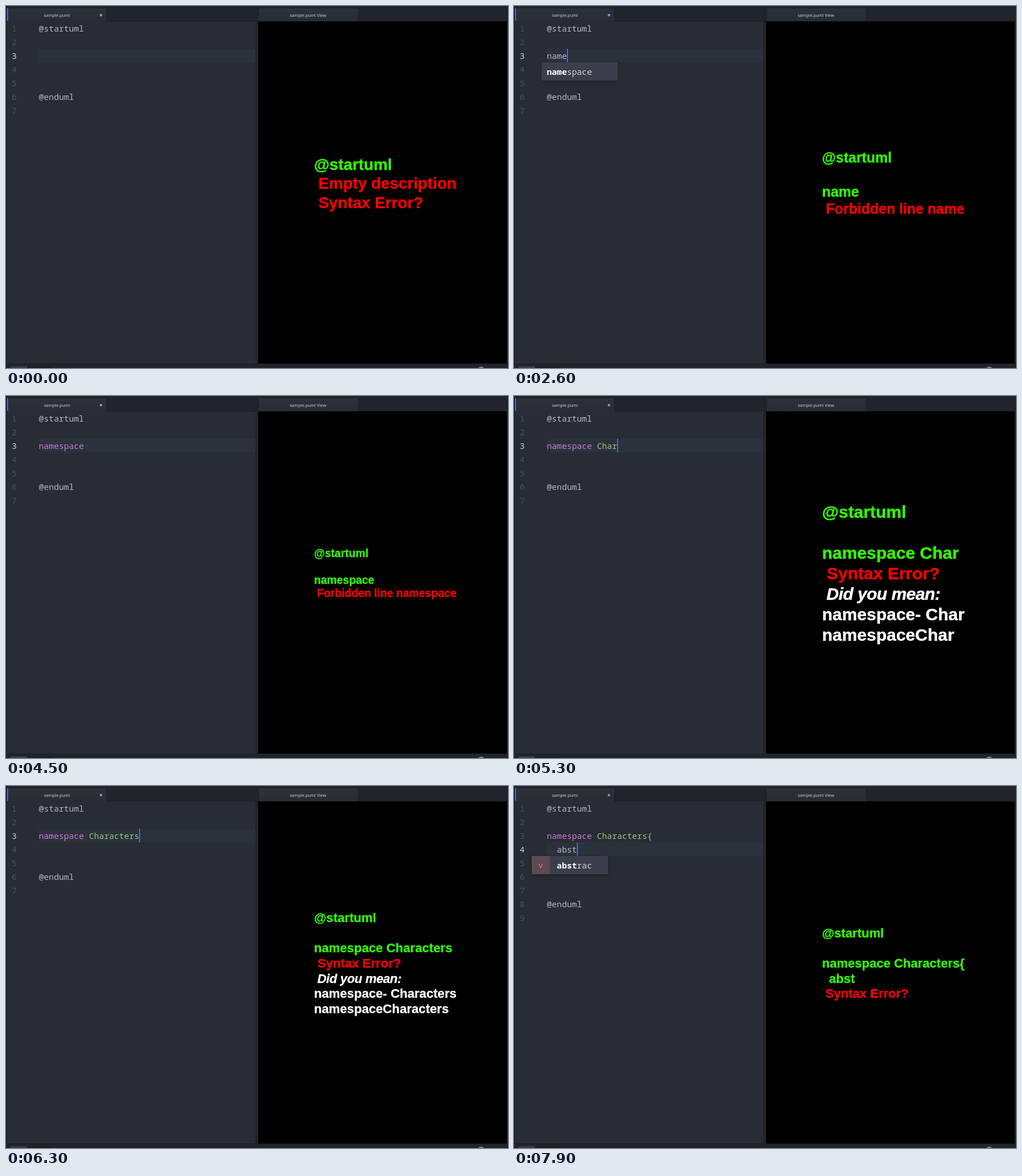
An HTML page with a canvas that plays this animation: 880 px wide and 636 px high, repeating every 8 s.

```html
<!DOCTYPE html>
<html lang="en">
<head>
<meta charset="utf-8">
<title>Diagram editor with live view</title>
<style>
html, body { margin: 0; width: 100%; height: 100%; overflow: hidden; background: #21252b; }
canvas { display: block; }
</style>
</head>
<body>
<canvas id="stage" width="880" height="636"></canvas>
<script>
const ctx = document.getElementById('stage').getContext('2d');
const LOOP = 8000;
const CHAR = 8.8, ROW = 24, TEXT_X = 57.5, TOP = 27;
const MONO = '14.667px "Noto Sans Mono", monospace';
const CODE = '500 ' + MONO, CODE_BOLD = 'bold ' + MONO;
const UI = '7.5px "Open Sans", sans-serif';
const SANS = '"Liberation Sans", Arial, sans-serif';
const GREEN = '#33ff02', RED = '#ff0000', WHITE = '#ffffff', GREY = '#b0b7c4';

// [time, text being typed]
const TYPED = [
  [0, ''], [2100, 'n'], [2200, 'na'], [2400, 'nam'], [2500, 'name'],
  [2800, 'names'], [2900, 'namesp'], [3000, 'namespa'], [3100, 'namespac'],
  [3200, 'namespace'], [3300, 'namespace '],
  [4900, 'namespace C'], [5100, 'namespace Ch'], [5200, 'namespace Cha'],
  [5300, 'namespace Char'], [5400, 'namespace Chara'], [5600, 'namespace Charac'],
  [5700, 'namespace Charact'], [5800, 'namespace Characte'], [5900, 'namespace Character'],
  [6200, 'namespace Characters'], [6500, 'namespace Characters{'],
  [6900, ''], [7400, 'a'], [7500, 'ab'], [7700, 'abs'], [7900, 'abst']
];

// [time, text shown in the view]
const VIEWED = [
  [0, ''], [2300, 'na'], [2600, 'name'], [2900, 'names'], [3100, 'namespa'],
  [3300, 'namespace'], [5000, 'namespace C'], [5200, 'namespace Cha'],
  [5300, 'namespace Char'], [5500, 'namespace Chara'], [5700, 'namespace Charac'],
  [6000, 'namespace Character'], [6300, 'namespace Characters'],
  [6600, 'namespace Characters{}'], [7100, 'diagram'],
  [7600, 'ab'], [7700, 'abs'], [7900, 'abst']
];

// Cursor is hidden inside these spans
const HIDDEN = [[0, 200], [600, 1000], [1300, 1700], [3800, 4100], [4500, 4900]];
const BLOCK_START = 6900;

function at(list, t) {
  let value = list[0][1];
  for (const [start, v] of list) if (t >= start) value = v;
  return value;
}

function box(x, y, w, h, color) {
  ctx.fillStyle = color;
  ctx.fillRect(x, y, w, h);
}

function label(text, x, y, color, font) {
  ctx.font = font;
  ctx.fillStyle = color;
  ctx.fillText(text, x, y);
}

function disc(x, y, r, color) {
  ctx.fillStyle = color;
  ctx.beginPath();
  ctx.arc(x, y, r, 0, Math.PI * 2);
  ctx.fill();
}

function code(text, row, col, color) {
  label(text, TEXT_X + col * CHAR, TOP + (row - 1) * ROW + 17.6, color, CODE);
}

function tab(x, title, titleX) {
  box(x - 1, 3, 176, 24, '#1b1e23');
  const fade = ctx.createLinearGradient(0, 4, 0, 27);
  fade.addColorStop(0, '#2d3138');
  fade.addColorStop(1, '#282c34');
  box(x, 4, 174, 23, fade);
  label(title, titleX, 18.5, '#d7dae0', UI);
}

function chrome() {
  box(0, 0, 880, 636, '#21252b');
  box(0, 26, 880, 1, '#1b1e23');
  tab(2, 'sample.puml', 66.5);
  tab(443, 'sample.puml View', 497.5);
  box(2, 4, 1.4, 22, '#568af2');
  disc(166.5, 16, 2.2, '#6a9be0');
  box(2, TOP, 435, 601, '#282c34');
  box(0, 628, 880, 1, '#1b1e23');
  box(8, 633, 29, 3, '#3a3f47');
  box(37, 633, 43, 3, '#1b1e23');
  disc(833, 640, 6.5, '#7d828b');
}

function popup(x, row, typed, word, textX, variable) {
  const y = TOP + row * ROW, w = variable ? 134 : 133.5;
  ctx.save();
  ctx.shadowColor = 'rgba(0,0,0,.4)';
  ctx.shadowBlur = 5;
  ctx.shadowOffsetY = 1;
  box(x, y, w, 32, '#3a3f4b');
  ctx.restore();
  if (variable) {
    box(x, y, 32, 32, '#5e4a53');
    label('v', x + 11.6, y + 20.5, '#e06c75', CODE);
  }
  const n = typed.length;
  label(typed, textX, y + 21.5, WHITE, CODE_BOLD);
  label(word.slice(n), textX + n * CHAR, y + 21.5, '#d0d4dc', CODE);
}

function editor(t) {
  const typed = at(TYPED, t);
  const block = t >= BLOCK_START;
  const row = block ? 4 : 3;
  const col = typed.length + (block ? 2 : 0);
  const y = TOP + (row - 1) * ROW;

  box(57.5, y, 379.5, ROW, '#2c323b');
  for (let i = 1; i <= (block ? 9 : 7); i++) {
    label(i, 10, TOP + (i - 1) * ROW + 17.6, i === row ? '#c6cbd4' : '#495162', CODE);
  }
  code('@startuml', 1, 0, GREY);
  code('@enduml', block ? 8 : 6, 0, GREY);

  const head = block ? 'namespace Characters{' : typed;
  const keyword = head.startsWith('namespace');
  code(head.slice(0, 9), 3, 0, keyword ? '#c678dd' : GREY);
  code(head.slice(10, 20), 3, 10, '#98c379');
  if (head.endsWith('{')) code(block ? '{' : '{}', 3, 20, GREY);
  if (block) {
    code(typed, 4, 2, GREY);
    code('}', 5, 0, GREY);
  }

  if (!HIDDEN.some(([a, b]) => t >= a && t < b)) {
    box(57.7 + col * CHAR, y, 1.3, ROW, '#528bff');
  }
  if (block && typed) popup(31, row, typed, 'abstrac', 75.1, true);
  if (!block && typed.length > 1 && !keyword) popup(48.5, row, typed, 'namespace', TEXT_X, false);
}

// Error report as [text, colour, slant]
function report(src) {
  const start = ['@startuml', GREEN], gap = ['', GREEN];
  const syntax = [' Syntax Error?', RED];
  if (!src) return [start, [' Empty description', RED], syntax];
  if (src.startsWith('ab')) {
    return [start, gap, ['namespace Characters{', GREEN], ['  ' + src, GREEN], syntax];
  }
  if (src.endsWith('}')) return [start, gap, [src, GREEN], syntax];
  const name = src.split(' ')[1];
  if (!name) return [start, gap, [src, GREEN], [' Forbidden line ' + src, RED]];
  return [start, gap, [src, GREEN], syntax, [' Did you mean:', WHITE, 'italic '],
    ['namespace- ' + name, WHITE], ['namespace' + name, WHITE]];
}

// The report is scaled so that its widest line fills the image width
function drawReport(lines) {
  const font = (size, slant = '') => `${slant}bold ${size}px ${SANS}`;
  let widest = 0;
  for (const [text, , slant] of lines) {
    if (slant) continue;
    ctx.font = font(100);
    widest = Math.max(widest, ctx.measureText(text).width);
  }
  const size = 100 * 250 / widest, step = size * 1.203;
  ctx.save();
  ctx.lineWidth = size * 0.015;
  ctx.lineJoin = 'round';
  lines.forEach(([text, color, slant], i) => {
    const y = 311 + (i - lines.length / 2) * step + size * 0.965;
    ctx.letterSpacing = slant ? `${-size * 0.018}px` : '0px';
    label(text, 540, y, color, font(size, slant));
    ctx.strokeStyle = color;
    ctx.strokeText(text, 540, y);
  });
  ctx.restore();
}

function drawPackage() {
  ctx.save();
  ctx.lineWidth = 4.6;
  ctx.strokeStyle = '#000';
  ctx.beginPath();
  [[554, 226.3], [744.5, 226.3], [760, 280.5], [776, 280.5], [776, 393], [554, 393]]
    .forEach(([x, y]) => ctx.lineTo(x, y));
  ctx.closePath();
  ctx.shadowColor = 'rgba(0,0,0,.5)';
  ctx.shadowBlur = 9;
  ctx.shadowOffsetX = ctx.shadowOffsetY = 9;
  ctx.fillStyle = WHITE;
  ctx.fill();
  ctx.shadowColor = 'transparent';
  ctx.moveTo(554, 280.5);
  ctx.lineTo(762, 280.5);
  ctx.stroke();
  ctx.restore();
  label('Characters', 560, 266.5, '#000', `bold 33.7px ${SANS}`);
}

function view(t) {
  const src = at(VIEWED, t);
  const diagram = src === 'diagram';
  box(442, TOP, 436, 601, diagram ? WHITE : '#000');
  if (diagram) drawPackage();
  else drawReport(report(src));
}

function frame(now) {
  const t = now % LOOP;
  ctx.fontKerning = 'none';
  chrome();
  editor(t);
  view(t);
  requestAnimationFrame(frame);
}
frame(performance.now());
</script>
</body>
</html>
```
